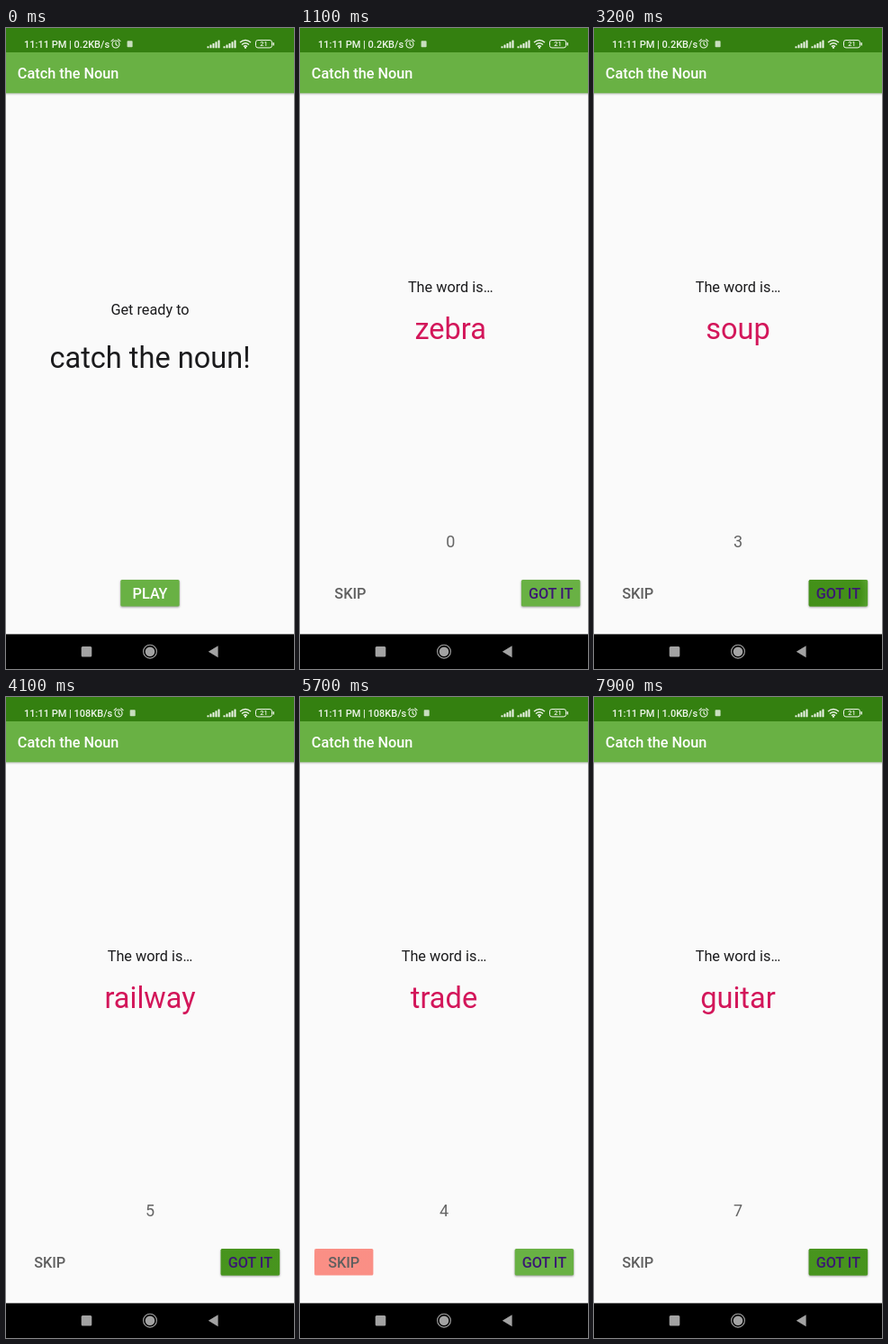
An HTML page that plays this animation: 320 px wide and 711 px high, repeating every 8 s.

```html
<!DOCTYPE html>
<html lang="en">
<head>
<meta charset="utf-8">
<title>Word game</title>
<style>
  html, body { margin: 0; width: 100%; height: 100%; overflow: hidden; background: #fafafa; }
  svg { display: block; width: 100vw; height: 100vh; font: 16.28px Roboto, "Open Sans", sans-serif; }
  .mid { text-anchor: middle; }
  .big { font-size: 32.56px; }
  .bold { font-weight: 500; }
  .lift { filter: drop-shadow(0 1px 1.2px rgba(0, 0, 0, .4)); }
</style>
</head>
<body>
<svg viewBox="0 0 320 711" preserveAspectRatio="none">
  <defs>
    <radialGradient id="greenInk">
      <stop offset=".65" stop-color="#3f8d14"/>
      <stop offset="1" stop-color="#3f8d14" stop-opacity="0"/>
    </radialGradient>
    <radialGradient id="pinkInk">
      <stop offset=".65" stop-color="#fa7468"/>
      <stop offset="1" stop-color="#fa7468" stop-opacity="0"/>
    </radialGradient>
    <linearGradient id="barShadow" x2="0" y2="1">
      <stop stop-color="#000" stop-opacity=".22"/>
      <stop offset="1" stop-color="#000" stop-opacity="0"/>
    </linearGradient>
    <clipPath id="playClip"><rect x="127.3" y="612" width="65.4" height="29.5" rx="1.6"/></clipPath>
    <clipPath id="gotClip"><rect x="238.7" y="612" width="65.4" height="29.5" rx="1.6"/></clipPath>
    <clipPath id="skipClip"><rect x="16" y="612" width="65.4" height="29.5" rx="1.6"/></clipPath>
  </defs>

  <rect width="320" height="711" fill="#fafafa"/>

  <g id="start" fill="#1b1b1d">
    <text class="mid" x="160" y="318.3">Get ready to</text>
    <text class="mid big" x="160" y="377.3">catch the noun!</text>
    <rect class="lift" x="127.3" y="612" width="65.4" height="29.5" rx="1.6" fill="#69b144"/>
    <g id="playInk" clip-path="url(#playClip)"></g>
    <text class="mid bold" x="160" y="633.4" fill="#fff">PLAY</text>
  </g>

  <g id="game">
    <text class="mid" x="160" y="292.8" fill="#1b1b1d">The word is…</text>
    <text class="mid big" id="word" x="160" y="345.3" fill="#d3165a"></text>
    <text class="mid" id="score" x="160" y="576" font-size="18" fill="#656565"></text>
    <g id="skipInk" clip-path="url(#skipClip)"></g>
    <text class="mid bold" x="48.7" y="633.4" fill="#5f5f5f">SKIP</text>
    <rect class="lift" x="238.7" y="612" width="65.4" height="29.5" rx="1.6" fill="#69b144"/>
    <g id="gotInk" clip-path="url(#gotClip)"></g>
    <text class="mid bold" x="271.4" y="633.4" fill="#3a1773">GOT IT</text>
  </g>

  <rect y="72" width="320" height="3" fill="url(#barShadow)"/>
  <rect y="26" width="320" height="46.3" fill="#69b144"/>
  <rect width="320" height="27" fill="#348010"/>
  <text class="bold" x="12.8" y="56.3" fill="#fff">Catch the Noun</text>

  <g fill="#eef5ea">
    <text class="bold" id="status" x="20" y="21.6" font-size="11"></text>
    <g id="icons">
      <g fill="none" stroke="#eef5ea" stroke-width="1.1" stroke-linecap="round">
        <circle cx="122" cy="18" r="4"/>
        <path d="M122 15.8v2.4l1.6 1.2M117 14.6l2.3-1.9M127 14.6l-2.3-1.9"/>
      </g>
      <rect x="134.6" y="14.2" width="6" height="7" rx=".8" opacity=".8"/>
    </g>
    <g id="signals"></g>
    <g fill="none" stroke="#eef5ea" stroke-width="1.5">
      <path d="M260 16q6-5 12 0M262 18.5q4-3.4 8 0M264 20.6q2-1.6 4 0"/>
    </g>
    <circle cx="266" cy="21.8" r="1.1"/>
    <rect x="277.5" y="13.5" width="18" height="8.4" rx="2.4" fill="none" stroke="#eef5ea"/>
    <rect x="296.6" y="16" width="1.4" height="3.6" rx=".6"/>
    <text class="mid bold" x="286.4" y="20.4" font-size="7.4">21</text>
  </g>

  <rect y="672.4" width="320" height="38.6"/>
  <g fill="#a3a3a3">
    <rect x="83.7" y="686" width="11.6" height="11.6" rx="1.5"/>
    <circle cx="160" cy="691.7" r="5.3"/>
    <circle cx="160" cy="691.7" r="7.4" fill="none" stroke="#a3a3a3" stroke-width="1.1"/>
    <path d="M224.8 691.7L235.6 685.2V698.2Z"/>
  </g>
</svg>

<script>
const LOOP = 8000, STEP = 100;
const SLIDE_AT = 760, SLIDE_MS = 400;
const HOLD_MS = 150, GROW_MS = 350, FADE_MS = 500;

// [release time, button, next word, touch x]
const taps = [
  [760, "play", "zebra", 158],
  [2200, "got", "basketball", 266],
  [2700, "got", "snail", 268],
  [3150, "got", "soup", 264],
  [3600, "got", "car", 266],
  [4000, "got", "railway", 264],
  [4450, "got", "desk", 266],
  [5150, "skip", "bag", 52],
  [5600, "skip", "trade", 55],
  [6000, "skip", "roll", 52],
  [6350, "got", "home", 263],
  [6800, "got", "queen", 266],
  [7300, "got", "jelly", 264],
  [7800, "got", "guitar", 264]
];
const points = { play: 0, got: 1, skip: -1 };
const speeds = [[0, "0.2KB/s", 0], [3300, "108KB/s", 3.1], [7300, "1.0KB/s", 0]];

const el = id => document.getElementById(id);
const clamp = v => Math.max(0, Math.min(1, v));
const shift = (id, x) => el(id).setAttribute("transform", `translate(${x} 0)`);

function add(parent, tag, attrs) {
  const node = document.createElementNS("http://www.w3.org/2000/svg", tag);
  for (const key in attrs) node.setAttribute(key, attrs[key]);
  return parent.appendChild(node);
}

for (const x of [223.5, 241.5])
  for (let i = 0; i < 5; i++) {
    const h = 2 + i * 1.7;
    add(el("signals"), "rect", { x: x + i * 3, y: 22.3 - h, width: 2, height: h, rx: 0.5 });
  }

const inks = taps.map(([, button, , x]) => add(el(button + "Ink"), "circle", {
  cx: x, cy: 627, fill: `url(#${button === "skip" ? "pink" : "green"}Ink)`
}));

function draw(t) {
  const left = (1 - clamp((t - SLIDE_AT) / SLIDE_MS)) ** 2;
  shift("start", -320 * (1 - left));
  shift("game", 320 * left);

  let word = "zebra", score = 0;
  taps.forEach(([at, button, next], i) => {
    if (t >= at) {
      word = next;
      score += points[button];
    }
    const age = t - at + HOLD_MS;
    const alpha = clamp(age / 75) * (1 - clamp((t - at) / FADE_MS));
    inks[i].setAttribute("r", 10 + 70 * clamp(age / GROW_MS));
    inks[i].setAttribute("opacity", alpha);
  });
  el("word").textContent = word;
  el("score").textContent = score;

  const [, speed, dx] = speeds.filter(s => t >= s[0]).pop();
  el("status").textContent = "11:11 PM | " + speed;
  shift("icons", dx);
}

const begin = performance.now();
function tick() {
  const t = (performance.now() - begin) % LOOP;
  draw(Math.floor(t / STEP) * STEP);
  requestAnimationFrame(tick);
}
tick();
</script>
</body>
</html>
```
